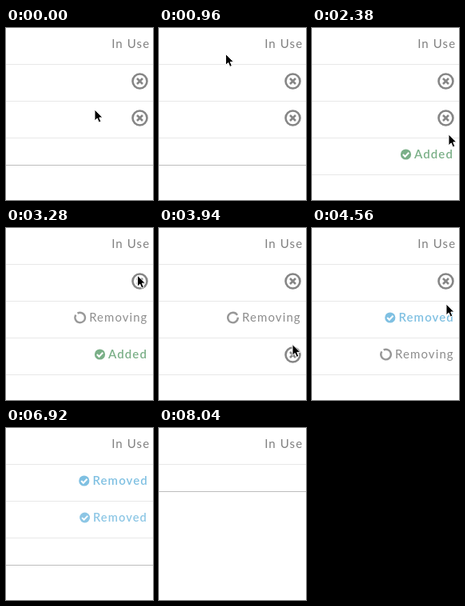
An HTML page for the animation above (8.12 s loop, 184 px wide and 215 px high).

```html
<!DOCTYPE html>
<html lang="en">
<head>
<meta charset="utf-8">
<title>In Use</title>
<style>
  html, body { margin: 0; width: 100%; height: 100%; overflow: hidden; background: #fff; }
  svg { display: block; width: 184px; height: 215px; }
  text { font: 400 15px Lato, sans-serif; letter-spacing: 1.1px; fill: #808080; }
  .line { fill: #e8e8e8; }
  .end { fill: #bdbdbd; }
  .remove { fill: none; stroke: #868686; stroke-width: 2.6; }
  .remove.hover { stroke: #5c5c5c; }
  .removing text { fill: #8c8c8c; }
  .spin { fill: none; stroke: #979797; stroke-width: 2.4; }
  .added, .removed { fill: #7bb088; }
  .removed { fill: #7fc0e2; }
  .added text, .removed text { font-weight: 600; fill: inherit; }
  .tick { fill: none; stroke: #fff; stroke-width: 2.1; }
</style>
</head>
<body>
<svg viewBox="0 0 184 215">
  <text x="132.2" y="25">In Use</text>
  <rect class="line" y="45" width="184" height="1"/>
  <g id="rows"></g>
  <rect id="end" class="end" width="184" height="1"/>
  <path id="cursor" d="M0 0V14L3.2 11 5.3 16 7.9 14.9 5.8 10H10Z" stroke="#fff" stroke-width="1"/>
</svg>
<script>
const LOOP = 8120, HEAD = 46, ROW = 46, FOOT = 33, MID = 20.5;
const GROW = 170, EXIT_GAP = 240, HOVER_LAG = 80;

const check = x => `<circle cx="${x}" cy="20" r="6.6"/>
  <path class="tick" d="M${x - 3.6} 20.1l2.6 2.6 4.7-4.9"/>`;

// Each label: centre for scaling and its markup, relative to the row top
const labels = {
  remove: { cx: 167.5, body: `<circle cx="167.5" cy="20.5" r="9"/>
    <path d="M164 17l7 7m0-7l-7 7"/>` },
  added: { cx: 144.5, body: check(117.5) + '<text x="128" y="25">Added</text>' },
  removing: { cx: 131.5, body: `<path class="spin" d="M94 13.9a6.3 6.3 0 1 1-3 0"/>
    <text x="104" y="25">Removing</text>` },
  removed: { cx: 134.5, body: check(97.8) + '<text x="108.4" y="25">Removed</text>' }
};

// Steps: label and the time it arrives; exit: when the last one leaves
const rows = [
  { steps: [['remove', -999], ['removing', 4820], ['removed', 5770]], exit: 7630 },
  { steps: [['remove', -999], ['removing', 3150], ['removed', 4150]], exit: 6010 },
  { enter: 1400, exit: 6910,
    steps: [['added', 1560], ['remove', 3420], ['removing', 4410], ['removed', 5050]] }
];

// Pointer stops: time, x, y
const stops = [
  [10, 111, 102], [290, 26, -20], [770, 26, -20], [1150, 140, 84], [1400, 168, 118],
  [1590, 168.5, 121], [1820, 171, 173], [2090, 172, 137], [2210, 172, 137],
  [2870, 166, 112], [3150, 166, 112], [3290, 164.5, 58.5], [3420, 166, 54],
  [3560, 166, 56], [3960, 167, 146], [4310, 167, 153], [4410, 167, 153],
  [4560, 168, 95], [4730, 167, 66], [4880, 167, 66], [5200, 192, 60]
];

const $ = id => document.getElementById(id);
const clamp = v => Math.min(1, Math.max(0, v));
const smooth = k => k * k * (3 - 2 * k);

const holder = $('rows');
for (const row of rows) {
  const g = document.createElementNS('http://www.w3.org/2000/svg', 'g');
  g.innerHTML = row.steps.map(([name]) => `<g class="${name}">${labels[name].body}</g>`).join('')
    + '<rect class="line" width="184" height="1"/>';
  holder.append(g);
  row.el = g;
  row.line = g.lastChild;
  row.spin = g.querySelector('.spin');
}

function pointer(t) {
  const i = stops.findIndex(s => s[0] > t);
  if (i === 0) return stops[0].slice(1);
  if (i < 0) return stops[stops.length - 1].slice(1);
  const [t0, x0, y0] = stops[i - 1], [t1, x1, y1] = stops[i];
  const k = smooth((t - t0) / (t1 - t0));
  return [x0 + (x1 - x0) * k, y0 + (y1 - y0) * k];
}

function height(row, t) {
  const open = row.enter ? smooth(clamp((t - row.enter) / GROW)) : 1;
  return ROW * open * (1 - smooth(clamp((t - row.exit - EXIT_GAP) / GROW)));
}

function drawRow(row, top, h, t, [px, py]) {
  row.el.setAttribute('transform', `translate(0 ${top})`);
  row.line.setAttribute('y', h - 1);
  row.steps.forEach(([name, start], i) => {
    const end = i + 1 < row.steps.length ? row.steps[i + 1][1] : row.exit;
    const rise = 1 - (1 - clamp((t - start - 30) / 120)) ** 2;
    const v = Math.min(rise, 1 - clamp((t - end) / 100));
    const el = row.el.children[i], cx = labels[name].cx, s = 0.8 + 0.2 * v;
    el.setAttribute('opacity', v);
    el.setAttribute('transform', `translate(${cx} ${MID}) scale(${s}) translate(${-cx} ${-MID})`);
    if (name === 'remove')
      el.classList.toggle('hover', Math.hypot(px - cx, py - top - MID) < 10.5);
    if (name === 'removing')
      row.spin.setAttribute('transform', `rotate(${(t - start) * 0.18 - 68} 92.5 20)`);
  });
}

function draw(t) {
  const hover = pointer(t - HOVER_LAG);
  let top = HEAD;
  for (const row of rows) {
    const h = Math.round(height(row, t));
    drawRow(row, top, h, t, hover);
    top += h;
  }
  $('end').setAttribute('y', top + FOOT);
  $('cursor').setAttribute('transform', `translate(${pointer(t)})`);
}

const began = performance.now();
function tick() {
  draw((performance.now() - began) % LOOP);
  requestAnimationFrame(tick);
}
tick();
</script>
</body>
</html>
```
